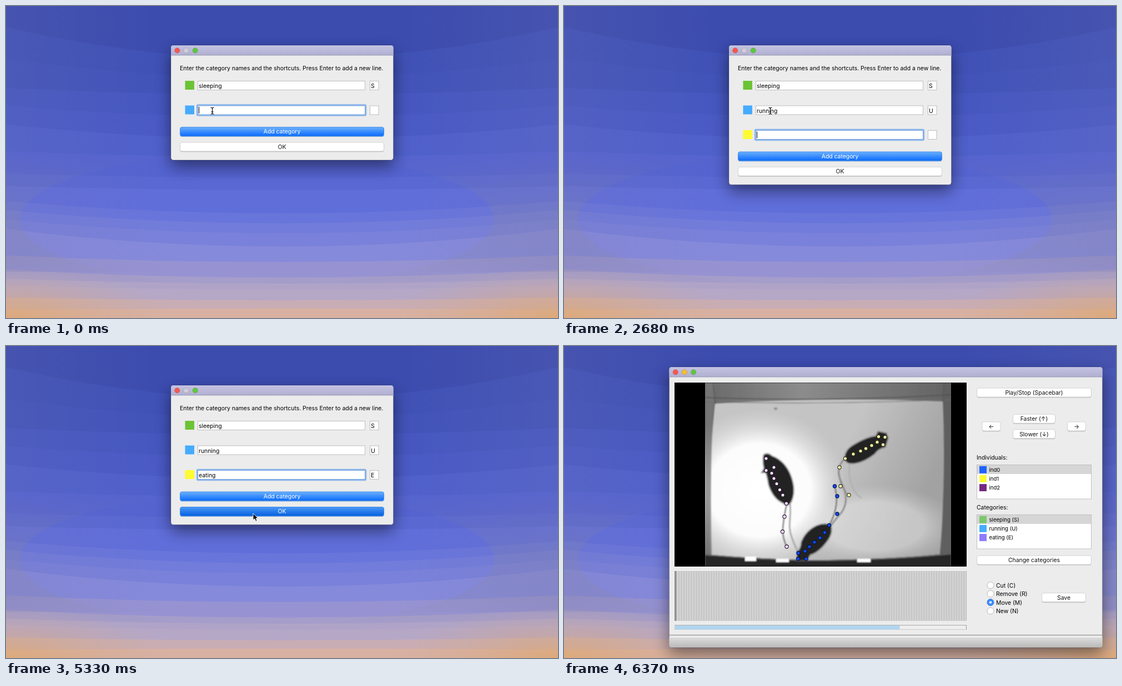
An HTML page for the animation above (7.13 s loop, 994 px wide and 563 px high).

```html
<!DOCTYPE html>
<html lang="en">
<head>
<meta charset="utf-8">
<title>Category setup</title>
<style>
html, body { margin: 0; width: 100%; height: 100%; overflow: hidden; background: #4f60cb; }
svg { display: block; width: 994px; height: 563px; }
text { font: 10.4px Inter, "Liberation Sans", sans-serif; white-space: pre; }
.list text { font-size: 9.6px; }
.mid { text-anchor: middle; }
</style>
</head>
<body>
<svg viewBox="0 0 994 563" xmlns="http://www.w3.org/2000/svg">
  <defs>
    <linearGradient id="side">
      <stop offset="0" stop-color="#7474b4" stop-opacity=".2"/>
      <stop offset=".3" stop-color="#7474b4" stop-opacity="0"/>
      <stop offset=".7" stop-color="#7474b4" stop-opacity="0"/>
      <stop offset="1" stop-color="#7474b4" stop-opacity=".2"/>
    </linearGradient>
    <linearGradient id="haze" x2="0" y2="1">
      <stop offset="0" stop-color="#8c8796" stop-opacity="0"/>
      <stop offset=".45" stop-color="#8c8796" stop-opacity=".2"/>
      <stop offset=".8" stop-color="#8c8796" stop-opacity=".16"/>
      <stop offset="1" stop-color="#8c8796" stop-opacity="0"/>
    </linearGradient>
    <radialGradient id="warm">
      <stop offset="0" stop-color="#e0a668" stop-opacity=".7"/>
      <stop offset="1" stop-color="#d0a890" stop-opacity="0"/>
    </radialGradient>
    <linearGradient id="bar" x2="0" y2="1">
      <stop offset="0" stop-color="#c4c3e2"/><stop offset="1" stop-color="#b0afd0"/>
    </linearGradient>
    <linearGradient id="blue" x2="0" y2="1">
      <stop offset="0" stop-color="#6bb0fb"/><stop offset="1" stop-color="#0b6cfd"/>
    </linearGradient>
    <linearGradient id="pressed" x2="0" y2="1">
      <stop offset="0" stop-color="#4b99f7"/><stop offset="1" stop-color="#0560df"/>
    </linearGradient>
    <linearGradient id="status" x2="0" y2="1">
      <stop offset="0" stop-color="#dcdcdc"/><stop offset="1" stop-color="#b9b9b9"/>
    </linearGradient>
    <linearGradient id="floor" x2="1" y2=".35">
      <stop offset="0" stop-color="#c6c6c6"/><stop offset=".6" stop-color="#c4c4c4"/><stop offset="1" stop-color="#a2a2a2"/>
    </linearGradient>
    <radialGradient id="glow">
      <stop offset="0" stop-color="#fff"/><stop offset=".58" stop-color="#fcfcfc"/>
      <stop offset="1" stop-color="#ddd" stop-opacity="0"/>
    </radialGradient>
    <linearGradient id="wall" x2="1" y2="0">
      <stop offset="0" stop-color="#686868"/><stop offset=".4" stop-color="#8c8c8c"/><stop offset="1" stop-color="#626262"/>
    </linearGradient>
    <pattern id="ticks" x="202" y="0" width="3" height="9" patternUnits="userSpaceOnUse">
      <rect width="3" height="9" fill="#ededed"/><rect width="1.4" height="9" fill="#a9a9a9"/>
    </pattern>
    <filter id="shade" x="-30%" y="-30%" width="160%" height="170%"><feGaussianBlur stdDeviation="14"/></filter>
    <filter id="soft" x="-30%" y="-30%" width="160%" height="160%"><feGaussianBlur stdDeviation=".9"/></filter>
    <clipPath id="view"><rect x="254" y="66.5" width="443" height="331"/></clipPath>
  </defs>
  <g id="sky"></g>
  <g id="scene"></g>
</svg>
<script>
const LOOP = 7130;
const $ = id => document.getElementById(id);
const pen = document.createElement('canvas').getContext('2d');
pen.font = '10.4px Inter, "Liberation Sans", sans-serif';

const rect = (x, y, w, h, fill, more = '') =>
  `<rect x="${x}" y="${y}" width="${w}" height="${h}" fill="${fill}" ${more}/>`;
const dot = (x, y, r, fill, more = '') => `<circle cx="${x}" cy="${y}" r="${r}" fill="${fill}" ${more}/>`;
const path = (d, fill, more = '') => `<path d="${d}" fill="${fill}" ${more}/>`;
const line = (d, color, width) => path(d, 'none', `stroke="${color}" stroke-width="${width}" stroke-linecap="round"`);
const text = (x, y, s, more = '') => `<text x="${x}" y="${y}" ${more}>${s}</text>`;

function button(x, y, w, label, fill = '#fff', h = 17) {
  const plain = fill === '#fff';
  return rect(x + .5, y + 1, w - 1, h, plain ? '#b4b4b4' : '#3f7fd0', 'rx="3.5" opacity=".7"') +
    rect(x + .5, y + .5, w - 1, h - 1, fill, `rx="3.5" stroke="${plain ? '#c6c6c6' : '#2f7fe8'}" stroke-width=".7"`) +
    text(x + w / 2, y + h / 2 + 3.8, label, `class="mid" fill="${plain ? '#111' : '#fff'}"`);
}

function frame(x, y, w, h, lights) {
  return rect(x - 1, y + 12, w + 2, h, '#000', 'rx="8" opacity=".46" filter="url(#shade)"') +
    rect(x, y, w, h, '#ececec', 'rx="4.5" stroke="#000" stroke-opacity=".25" stroke-width=".8"') +
    path(`M${x} ${y + 18}v-13.5q0-4.5 4.5-4.5h${w - 9}q4.5 0 4.5 4.5v13.5z`, 'url(#bar)') +
    rect(x, y + 17.5, w, .8, '#9391b0') +
    lights.map((c, i) => dot(x + 11.3 + i * 16.2, y + 9.3, 4.7, c, 'stroke="#000" stroke-opacity=".18" stroke-width=".7"')).join('');
}

function drawSky() {
  // contour height at the sides, height in the middle, colour
  const bands = [
    [0, 0, '#3b4bae'], [38, 96, '#3f51b6'], [95, 130, '#4153b9'], [148, 160, '#4557c0'],
    [180, 200, '#495ac5'], [214, 240, '#4f60cb'], [262, 272, '#5463d0'], [302, 310, '#5968d3'],
    [325, 332, '#606edaff'], [352, 374, '#6875db'], [368, 392, '#727cda'], [385, 410, '#7981da'],
    [402, 434, '#868adb'], [450, 462, '#9793d2'], [476, 490, '#a59dca'], [492, 501, '#afa4c8'],
    [504, 512, '#b5a7c6'], [526, 531, '#c8adb4'], [548, 546, '#d8b1a3']
  ];
  $('sky').innerHTML =
    bands.map(([e, c, fill]) => path(`M0 ${e}Q497 ${2 * c - e} 994 ${e}V563H0z`, fill)).join('') +
    rect(0, 0, 994, 480, 'url(#side)') +
    path('M0 270H994V500H0zM25 385a427 120 0 0 0 854 0a427 120 0 0 0-854 0z', 'url(#haze)', 'fill-rule="evenodd"') +
    [0, 994].map(x => `<ellipse cx="${x}" cy="566" rx="300" ry="95" fill="url(#warm)"/>`).join('');
}

function field(x, y, w, value, active, caret) {
  const end = x + 2 + (value ? pen.measureText(value).width : 0);
  return (active ? rect(x - .5, y - .5, w + 1, 18, '#fff', 'rx="1.5" stroke="#8db6ec" stroke-width="3.4"') : '') +
    rect(x + .5, y + .5, w - 1, 16, '#fff', `stroke="${active ? '#6f9fdc' : '#b9b9b9'}" stroke-width=".9"`) +
    text(x + 2, y + 13, value) +
    (active && caret ? rect(end, y + 2.5, 1, 12, '#000') : '');
}

function dialog(s) {
  const grow = (s.rows - 2) * 44.5;
  const colors = ['#6cc335', '#45abff', '#fdfb32'];
  let out = frame(297, 71, 400.5, 207 + grow, ['#f9564f', '#cfced8', '#5fc73c']) +
    text(313, 116, 'Enter the category names and the shortcuts. Press Enter to add a new line.');
  for (let i = 0; i < s.rows; i++) {
    const y = 135 + i * 44.5;
    out += rect(322.5, y, 16.5, 16, colors[i]) +
      field(345, y, 302, s['name' + i], s.focus === 'name' + i, s.caret) +
      field(655, y, 16.5, s['key' + i], s.focus === 'key' + i, s.caret);
  }
  return out + button(313, 218 + grow, 368, 'Add category', 'url(#blue)') +
    button(313, 245.5 + grow, 368, 'OK', s.ok ? 'url(#pressed)' : '#fff');
}

function video() {
  const bodies = [
    'M360 197Q366 192 374 199Q398 208 408 235Q418 262 408 282Q402 290 395 283Q377 275 369 250Q367 236 364 228L357 228L361 221Q358 210 360 197z',
    'M506 204Q506 188 522 179Q545 165 562 163L566 155L580 158L583 166L578 182Q566 184 559 194Q542 208 524 211Q509 213 506 204z',
    'M421 387L420 373Q428 365 428 354Q436 334 455 325Q470 319 480 324Q484 338 473 352Q458 372 443 376L437 386z'
  ];
  const tracks = [
    ['#fbeaff', '#2c1238', [364, 203, 364, 224.5, 378, 219, 374, 229.5, 378, 239, 383, 248.5, 388.5, 259.5, 394, 269, 400.5, 284, 397, 308, 393.5, 335, 401, 362]],
    ['#ffffa8', '#2e2e1c', [566.5, 163.5, 578, 164.5, 574.5, 178, 564, 173.5, 554, 179.5, 543.5, 185, 534, 189.5, 521, 195, 506.5, 203, 496, 219, 498, 253, 513, 269]],
    ['#0e4bff', '#08123c', [487.5, 253, 492, 271, 492, 303, 477.5, 323.5, 469.5, 336.5, 461, 346, 451, 354, 442, 362, 434, 370, 422, 373.5, 421.5, 384, 436, 384]]
  ];
  const dots = tracks.map(([fill, edge, p]) => p.map((x, i) =>
    i % 2 ? '' : dot(x, p[i + 1], 3.1, fill, `stroke="${edge}" stroke-width="1.1"`)).join('')).join('');
  return rect(199, 66, 526, 332, '#000') + '<g clip-path="url(#view)"><g filter="url(#soft)">' +
    rect(250, 60, 450, 345, 'url(#wall)') +
    path('M272 104Q480 92 682 100Q688 240 676 384Q470 392 264 378Q258 240 272 104z', 'url(#floor)') +
    '<ellipse cx="560" cy="325" rx="150" ry="75" fill="url(#glow)" opacity=".4"/>' +
    '<ellipse cx="352" cy="260" rx="160" ry="145" fill="url(#glow)"/>' +
    path('M254 66H271Q261 240 267 398H254z', '#777', 'opacity=".75"') +
    path('M697 66H682Q690 240 676 398H697z', '#5e5e5e') +
    line('M254 93Q470 101 697 88', '#505050', 1.6) + line('M254 101Q470 106 697 97', '#6c6c6c', 1.2) +
    line('M268 66L273 104M684 66L682 100', '#565656', 1.5) +
    path('M254 376Q350 384 440 386Q580 386 697 374V400H254z', '#252525') +
    line('M254 377Q350 385 440 387Q580 387 697 375', '#666', 2) +
    rect(326, 380, 20, 8, '#fff') + rect(382, 384, 23, 6, '#fff') + rect(528, 384, 24, 6, '#fff') +
    rect(378, 111, 6, 4, '#8e8e8e') +
    line('M407 286C410 306 402 325 410 345Q416 362 424 376', '#a8a8a8', 3) +
    line('M401 286Q396 306 394 330Q393 346 402 364', '#777', 2.6) +
    line('M515 210Q511 232 519 253Q524 267 535 274', '#b0b0b0', 2.5) +
    line('M506 203C487 220 496 239 502 252Q514 279 500 300Q490 311 480 325', '#8a8a8a', 3) +
    line('M487 253Q498 285 478 323', '#555', 2) +
    line('M496 219Q492 250 513 269', '#858585', 1.5) +
    bodies.map(d => path(d, '#262626', 'stroke="#686868" stroke-opacity=".5" stroke-width="4"') + path(d, '#242424')).join('') +
    '</g>' + dots + '</g>';
}

function list(y, rows) {
  return '<g class="list">' + rect(743.5, y + .5, 206, 61.5, '#fff', 'stroke="#bababa" stroke-width=".9"') +
    rect(744, y + 1, 205, 16, '#d6d6d6') +
    rows.map(([label, color], i) => rect(748, y + 2.7 + i * 16.2, 13, 13, color) +
      text(765.5, y + 12.7 + i * 16.2, label)).join('') + '</g>';
}

function mainWindow() {
  const radios = ['Cut (C)', 'Remove (R)', 'Move (M)', 'New (N)'].map((label, i) => {
    const y = 431.7 + i * 15.45, on = i === 2;
    return dot(768, y, 6, on ? '#3a8cfb' : '#fff', `stroke="${on ? '#2c78e4' : '#b4b4b4'}" stroke-width=".9"`) +
      (on ? dot(768, y, 2.2, '#fff') : '') + text(778, y + 4, label);
  }).join('');
  return frame(189.5, 38, 780, 506, ['#f9564f', '#f9bd2e', '#5fc73c']) + video() +
    rect(199, 406, 526, 90, 'url(#ticks)') + rect(199, 406, 3, 90, '#929292') +
    rect(199.5, 504, 525, 7.5, '#efefef', 'stroke="#c4c4c4" stroke-width=".8"') +
    rect(199.5, 504, 405, 7.5, '#b0d5ee') + rect(199, 503.5, 526, .8, '#aaa') +
    rect(724, 504, 1, 8, '#999') +
    rect(189.5, 521, 780, 1.3, '#979797') +
    path('M189.5 526h780v13.5q0 4.5-4.5 4.5h-771q-4.5 0-4.5-4.5z', 'url(#status)') +
    button(743, 75.5, 207, 'Play/Stop (Spacebar)') +
    button(752.5, 136.5, 34, '←') + button(906, 136.5, 34, '→') +
    button(808, 122.7, 77, 'Faster (↑)') + button(808, 150.2, 77, 'Slower (↓)') +
    text(743, 205, 'Individuals:') +
    list(214, [['ind0', '#1f62ff'], ['ind1', '#fdf936'], ['ind2', '#74297f']]) +
    text(743, 295, 'Categories:') +
    list(304, [['sleeping (S)', '#7bc86c'], ['running (U)', '#46adff'], ['eating (E)', '#8e7bff']]) +
    button(743, 377.7, 207, 'Change categories') + radios + button(860, 445.2, 80, 'Save');
}

function pointer([kind, x, y]) {
  const at = `transform="translate(${x} ${y})"`;
  if (kind === 'beam') {
    const d = 'M-2.6-5.7Q0-5.7 0-4V4.5Q0 6.2-2.6 6.2M2.6-5.7Q0-5.7 0-4V4.5Q0 6.2 2.6 6.2M-1.7 2H1.7';
    return `<g ${at}>${line(d, '#fff', 2.2)}${line(d, '#000', 1.1)}</g>`;
  }
  return path('M0 0V12.2L2.8 9.6L4.9 14.2L7 13.3L5.1 8.8H8.8z', '#000', `${at} stroke="#fff" stroke-width=".9"`);
}

const steps = [
  [0, { view: 'dialog', rows: 2, name0: 'sleeping', key0: 'S', name1: '', key1: '', name2: '', key2: '',
    focus: 'name1', caret: 1, ok: 0, mouse: ['beam', 371.5, 189] }],
  [300, { name1: 'r' }], [600, { name1: 'ru' }], [750, { name1: 'run' }], [900, { name1: 'runn' }],
  [1040, { name1: 'runni' }], [1190, { name1: 'running' }],
  [1480, { focus: 'key1' }], [2080, { caret: 0 }], [2230, { key1: 'U', caret: 1 }],
  [2680, { rows: 3, focus: 'name2' }], [3270, { caret: 0 }],
  [3570, { name2: 'e', key2: 'E', caret: 1 }], [3710, { name2: 'ea' }],
  [4010, { name2: 'eat' }], [4160, { name2: 'eatin' }], [4450, { name2: 'eating' }],
  [4750, { caret: 0 }], [4900, { mouse: ['beam', 388, 214] }], [5040, { mouse: ['arrow', 425, 272] }],
  [5190, { mouse: ['arrow', 445, 302] }], [5330, { ok: 1 }],
  [5480, { view: 'desktop' }], [5930, { view: 'main' }],
  [6220, { mouse: ['arrow', 626, 395] }], [6370, { mouse: null }]
];
const views = { dialog, desktop: () => '', main: mainWindow };
const start = performance.now();
let shown = 0;

function draw() {
  const t = (performance.now() - start) % LOOP;
  const past = steps.filter(([at]) => at <= t);
  if (past.length !== shown) {
    shown = past.length;
    const s = Object.assign({}, ...past.map(([, change]) => change));
    $('scene').innerHTML = views[s.view](s) + (s.mouse ? pointer(s.mouse) : '');
  }
  requestAnimationFrame(draw);
}

drawSky();
draw();
</script>
</body>
</html>
```
